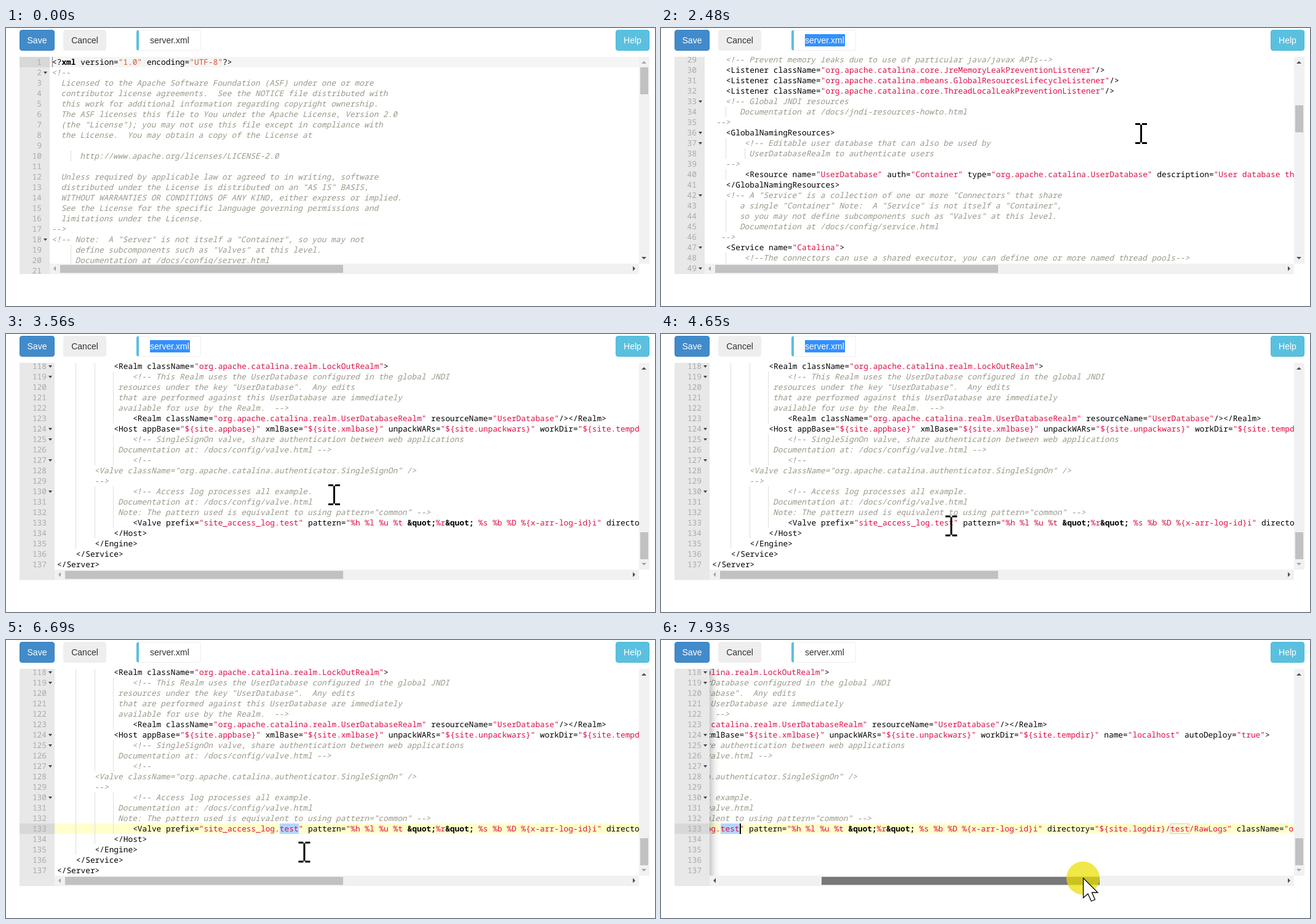
These frames come from a looping animation (1055 px wide and 453 px high, 8 s). An HTML page:

```html
<!DOCTYPE html>
<html lang="en">
<head>
<meta charset="utf-8">
<title>server.xml</title>
<style>
@property --s { syntax: '<length>'; inherits: true; initial-value: 0px }
@property --x { syntax: '<length>'; inherits: true; initial-value: 0px }
@property --g { syntax: '<length>'; inherits: true; initial-value: 49px }

html, body { margin: 0; width: 100%; height: 100%; overflow: hidden; background: #fff }
body { position: relative; font: 14px/20px "Liberation Sans", Arial, sans-serif; color: #333 }
div, svg { position: absolute; box-sizing: border-box }

.btn { top: 3px; height: 34px; border: 1px solid; border-radius: 4px; line-height: 32px; text-align: center; color: #fff }
#save { left: 22px; width: 57px; background: #428bca; border-color: #357ebd }
#cancel { left: 93px; width: 70px; background: #eee; border-color: #eee; color: #333 }
#help { left: 991px; width: 55px; background: #5bc0de; border-color: #46b8da }
#tab { left: 212px; top: 3px; width: 105px; height: 34px; border: 1px solid #eee; border-left: 4px solid #5bc0de; border-radius: 4px }
#name, #mark { left: 234px; top: 10px; height: 20px; white-space: nowrap }
#mark { width: 0; overflow: hidden; background: #3390ff; color: #fff }

#ed { left: 22px; top: 47px; width: 1024px; height: 354px; overflow: hidden; color: #000;
  font: 12.83px/17px "Noto Sans Mono", "DejaVu Sans Mono", monospace; text-rendering: geometricPrecision }
#gut { left: 0; top: 0; width: var(--g); height: 354px; overflow: hidden; background: #e8e8e8; color: #aaa }
#nums { left: 0; top: 0; width: 100%; transform: translateY(calc(0px - var(--s))) }
#nums p { position: relative; margin: 0; height: 17px; padding-right: 13px; text-align: right }
#nums .fold::after { content: ""; position: absolute; right: 4px; top: 7px; width: 6px; height: 4px;
  background: #444; clip-path: polygon(0 0, 100% 0, 50% 100%) }
#now { left: 0; top: 0; width: 100%; height: 17px; background: rgba(0,0,0,.07) }

#view { left: var(--g); top: 0; right: 17px; height: 337px; overflow: hidden }
#shade { inset: 0; box-shadow: 17px 0 16px -16px rgba(0,0,0,.4) inset }
#doc { left: 4px; top: 0; width: 3000px; transform: translate(calc(0px - var(--x)), calc(0px - var(--s))) }
#doc p { position: relative; margin: 0; height: 17px; white-space: pre }
#doc i { display: inline-block; width: 4ch; height: 17px; vertical-align: top; box-shadow: inset -1px 0 #dedede }
#doc em { position: relative; left: -1px; color: #998 }
#doc .str { color: #d14 }
#doc p.first .str { color: #d4562f }
#doc b { color: #000 }
#row, #pick, #twin { height: 17px }
#pick, #twin { top: 2244px }
#row { left: -4px; width: 3000px }
#pick { background: #b5d5ff }
#twin { left: 142ch; width: 4ch; border: 1px solid #c8c8fa }
#caret { height: 17px; width: 2px; background: #000 }

.bar { background: #f1f1f1 }
#vbar { right: 0; top: 0; width: 17px; height: 337px }
#hbar { left: var(--g); right: 17px; top: 337px; height: 17px }
#vthumb { left: 2px; width: 13px; height: 44px; top: calc(17px + var(--s) * .13); background: #c1c1c1 }
#hthumb { top: 2px; height: 13px; width: calc(509px - var(--g)); left: calc(17px + var(--x) * .4735); background: #c1c1c1 }
.tip { background: #505050 }
#up { left: 4px; top: 7px; width: 8px; height: 4px; clip-path: polygon(50% 0, 100% 100%, 0 100%) }
#down { left: 4px; bottom: 7px; width: 8px; height: 4px; clip-path: polygon(0 0, 100% 0, 50% 100%) }
#left { left: 6px; top: 4px; width: 4px; height: 8px; clip-path: polygon(100% 0, 100% 100%, 0 50%) }
#right { right: 6px; top: 4px; width: 4px; height: 8px; clip-path: polygon(0 0, 100% 50%, 0 100%) }

#cur { left: 0; top: 0 }
#ring { left: -27px; top: -27px; width: 54px; height: 54px; border-radius: 50%; background: rgba(235,224,0,.72) }
#cur svg { left: 0; top: 0; overflow: visible; width: 1px; height: 1px }

/* One loop is 8 s, so 1% is 80 ms */
#mark, #now, #shade, #row, #pick, #twin, #caret, #hthumb, #up, #down, #left, #cur, #ring, #beam, #arrow, #ed {
  animation: 8s step-end infinite }
#ed { animation-name: scroll, slide, widen }
#mark { animation-name: mark }
#now { animation-name: now }
#row { animation-name: row }
#pick { animation-name: pick }
#twin { animation-name: twin }
#caret { animation-name: caret, blink }
#shade { animation-name: shade }
#hthumb { animation-name: grab }
#up { animation-name: up }
#down { animation-name: down }
#left { animation-name: left }
#cur { animation-name: move }
#ring { animation-name: press }
#beam { animation-name: beam }
#arrow { animation-name: arrow }

@keyframes scroll {
  0% { --s: 0px }
  26.25% { --s: 0px; animation-timing-function: steps(6) }
  31% { --s: 480px; animation-timing-function: steps(5) }
  35.25% { --s: 1180px; animation-timing-function: steps(6) }
  40.625%, 100% { --s: 1992px }
}
@keyframes slide {
  0% { --x: 0px }
  90.125% { --x: 0px; animation-timing-function: steps(6) }
  95.125% { --x: 46px; animation-timing-function: steps(5) }
  99.125%, 100% { --x: 348px }
}
@keyframes widen { 0% { --g: 49px } 36.2%, 100% { --g: 57px } }
@keyframes mark {
  0% { width: 0 }
  15.125% { width: 22px }
  16% { width: 59px }
  16.875% { width: 64.5px }
  61.375%, 100% { width: 0 }
}
@keyframes now { 0% { top: 0 } 61.375%, 100% { top: 2244px } }
@keyframes row {
  0% { top: 0; background: #f5f5f5 }
  61.375%, 100% { top: 2244px; background: #ffc }
}
@keyframes pick {
  0% { left: 53ch; width: 0ch }
  61.375% { left: 53ch; width: 0ch; animation-timing-function: steps(11) }
  66.5% { left: 42ch; width: 11ch }
  73.125% { left: 49ch; width: 0ch }
  74%, 100% { left: 47ch; width: 4ch }
}
@keyframes twin { 0% { visibility: hidden } 74%, 100% { visibility: visible } }
@keyframes caret {
  0% { left: 0ch; top: 0; width: 1px }
  61.375% { left: 53ch; top: 2244px; width: 2px; animation-timing-function: steps(11) }
  66.5% { left: 42ch; top: 2244px; width: 2px }
  73.125% { left: 49ch; top: 2244px; width: 2px }
  74%, 100% { left: 51ch; top: 2244px; width: 2px }
}
@keyframes blink {
  0% { opacity: .5 }
  61.375%, 86.5%, 99%, 100% { opacity: 1 }
  80.25%, 92.75% { opacity: 0 }
}
@keyframes shade { 0% { opacity: 0 } 91%, 100% { opacity: 1 } }
@keyframes grab {
  0% { background: #c1c1c1 }
  87.2% { background: #a8a8a8 }
  88.25%, 100% { background: #787878 }
}
@keyframes up { 0% { background: #a3a3a3 } 27%, 100% { background: #505050 } }
@keyframes down { 0% { background: #505050 } 40.625%, 100% { background: #a3a3a3 } }
@keyframes left { 0% { background: #a3a3a3 } 91%, 100% { background: #505050 } }
@keyframes press {
  0%, 17.5%, 69.875%, 75.5% { visibility: hidden }
  14.375%, 61.375%, 73.125%, 88.25%, 100% { visibility: visible }
}
@keyframes beam {
  0%, 87.2%, 100% { visibility: hidden }
  1.625% { visibility: visible }
}
@keyframes arrow {
  0%, 1.625% { visibility: hidden }
  .875%, 87.2%, 100% { visibility: visible }
}
@keyframes move {
  0%, .875% { transform: translate(993px, 425px) }
  1.625% { transform: translate(720px, 330px) }
  2.5% { transform: translate(380px, 150px) }
  3.25% { transform: translate(215px, 50px) }
  5% { transform: translate(212px, 55px); animation-timing-function: steps(3) }
  7.5% { transform: translate(201px, 47px); animation-timing-function: steps(4) }
  11.25% { transform: translate(220px, 26px); animation-timing-function: steps(3) }
  13.5% { transform: translate(234px, 22px) }
  15.125% { transform: translate(255px, 22px) }
  16% { transform: translate(290px, 23px) }
  16.875% { transform: translate(296px, 23px) }
  18.75% { transform: translate(296px, 23px); animation-timing-function: steps(7) }
  24.375% { transform: translate(769px, 116px); animation-timing-function: steps(8) }
  31% { transform: translate(778px, 169px); animation-timing-function: steps(11) }
  40.625% { transform: translate(776px, 174px); animation-timing-function: steps(5) }
  44.5% { transform: translate(531px, 259px) }
  45.375% { transform: translate(458px, 292px) }
  46.25% { transform: translate(436px, 300px); animation-timing-function: steps(4) }
  50% { transform: translate(382px, 312px); animation-timing-function: steps(7) }
  55.625% { transform: translate(447px, 311px) }
  56.5% { transform: translate(460px, 310px); animation-timing-function: steps(3) }
  59% { transform: translate(488px, 309px) }
  61.375% { transform: translate(488px, 308px); animation-timing-function: steps(6) }
  66.5% { transform: translate(406px, 308px) }
  69% { transform: translate(401px, 308px) }
  69.875% { transform: translate(401px, 308px); animation-timing-function: steps(4) }
  73.125% { transform: translate(458px, 307px) }
  79.625% { transform: translate(458px, 307px); animation-timing-function: steps(10) }
  88.25% { transform: translate(519px, 396px) }
  90.125% { transform: translate(519px, 396px); animation-timing-function: steps(6) }
  95.125% { transform: translate(535px, 396px); animation-timing-function: steps(5) }
  99.125%, 100% { transform: translate(686px, 388px) }
}
</style>
</head>
<body>
<div class="btn" id="save">Save</div>
<div class="btn" id="cancel">Cancel</div>
<div id="tab"></div>
<div id="name">server.xml</div>
<div id="mark">server.xml</div>
<div class="btn" id="help">Help</div>

<div id="ed">
  <div id="gut"><div id="nums"><div id="now"></div></div></div>
  <div id="view">
    <div id="doc"><div id="row"></div><div id="pick"></div><div id="twin"></div></div>
    <div id="shade"></div>
  </div>
  <div class="bar" id="vbar"><div class="tip" id="up"></div><div id="vthumb"></div><div class="tip" id="down"></div></div>
  <div class="bar" id="hbar"><div class="tip" id="left"></div><div id="hthumb"></div><div class="tip" id="right"></div></div>
</div>

<div id="cur">
  <div id="ring"></div>
  <svg id="beam"><path d="M-7-12.5h8M4-12.500h8M-7 18.500h8M4 18.500h8M2.500-11.500v29" fill="none" stroke="#000" stroke-width="3"/></svg>
  <svg id="arrow"><path d="M.5 0V32L8 25.500 13.500 37.500 19.500 35 14.500 23.500H24Z" fill="#fff" stroke="#000" stroke-width="1.300"/></svg>
</div>

<script type="text/plain" id="src">
<?xml version="1.0" encoding="UTF-8"?>
<!--
  Licensed to the Apache Software Foundation (ASF) under one or more
  contributor license agreements.  See the NOTICE file distributed with
  this work for additional information regarding copyright ownership.
  The ASF licenses this file to You under the Apache License, Version 2.0
  (the "License"); you may not use this file except in compliance with
  the License.  You may obtain a copy of the License at

      http://www.apache.org/licenses/LICENSE-2.0

  Unless required by applicable law or agreed to in writing, software
  distributed under the License is distributed on an "AS IS" BASIS,
  WITHOUT WARRANTIES OR CONDITIONS OF ANY KIND, either express or implied.
  See the License for the specific language governing permissions and
  limitations under the License.
-->
<!-- Note:  A "Server" is not itself a "Container", so you may not
     define subcomponents such as "Valves" at this level.
     Documentation at /docs/config/server.html
 -->
<Server port="-1" shutdown="SHUTDOWN">
    <Listener className="org.apache.catalina.startup.VersionLoggerListener"/>
    <!-- Security listener. Documentation at /docs/config/listeners.html
  <Listener className="org.apache.catalina.security.SecurityListener" />
  -->
    <!--APR library loader. Documentation at /docs/apr.html -->
    <Listener className="org.apache.catalina.core.AprLifecycleListener" SSLEngine="on"/>
    <!-- Prevent memory leaks due to use of particular java/javax APIs-->
    <Listener className="org.apache.catalina.core.JreMemoryLeakPreventionListener"/>
    <Listener className="org.apache.catalina.mbeans.GlobalResourcesLifecycleListener"/>
    <Listener className="org.apache.catalina.core.ThreadLocalLeakPreventionListener"/>
    <!-- Global JNDI resources
       Documentation at /docs/jndi-resources-howto.html
  -->
    <GlobalNamingResources>
        <!-- Editable user database that can also be used by
         UserDatabaseRealm to authenticate users
    -->
        <Resource name="UserDatabase" auth="Container" type="org.apache.catalina.UserDatabase" description="User database that can be updated and saved" pathname="conf/tomcat-users.xml"/>
    </GlobalNamingResources>
    <!-- A "Service" is a collection of one or more "Connectors" that share
       a single "Container" Note:  A "Service" is not itself a "Container",
       so you may not define subcomponents such as "Valves" at this level.
       Documentation at /docs/config/service.html
   -->
    <Service name="Catalina">
        <!--The connectors can use a shared executor, you can define one or more named thread pools-->
        <!--
    <Executor name="tomcatThreadPool" namePrefix="catalina-exec-"
        maxThreads="150" minSpareThreads="4"/>
    -->
        <!-- A "Connector" represents an endpoint by which requests are received
         and responses are returned. Documentation at :
         Java HTTP Connector: /docs/config/http.html
         Java AJP  Connector: /docs/config/ajp.html
         APR (HTTP/AJP) Connector: /docs/apr.html
         Define a non-SSL/TLS HTTP/1.1 Connector on port 8080
    -->
        <Connector port="${port.http}" protocol="HTTP/1.1" connectionTimeout="20000" redirectPort="8443"/>
        <!-- A "Connector" using the shared thread pool-->
        <!--
    <Connector executor="tomcatThreadPool"
               port="8080" protocol="HTTP/1.1"
               connectionTimeout="20000"
               redirectPort="8443" />
    -->
        <!-- Define a SSL/TLS HTTP/1.1 Connector on port 8443
         This connector uses the NIO implementation that requires the JSSE
         style configuration. When using the APR/native implementation, the
         OpenSSL style configuration is required as described in the APR/native
         documentation
    -->
        <!--
    <Connector port="8443" protocol="org.apache.coyote.http11.Http11NioProtocol"
               maxThreads="150" SSLEnabled="true">
        <SSLHostConfig>
            <Certificate certificateKeystoreFile="conf/localhost-rsa.jks"
                         type="RSA" />
        </SSLHostConfig>
    </Connector>
               clientAuth="false" sslProtocol="TLS"
    -->
        <!-- Define an AJP 1.3 Connector on port 8009 -->
        <!--
    <Connector port="8009" protocol="AJP/1.3" redirectPort="8443" />
    -->
        <!-- An Engine represents the entry point (within Catalina) that processes
         every request.  The Engine implementation for Tomcat stand alone
         analyzes the HTTP headers included with the request, and passes them
         on to the appropriate Host (virtual host).
         Documentation at /docs/config/engine.html
    -->
        <!-- You should set jvmRoute to support load-balancing via AJP ie :
    <Engine name="Catalina" defaultHost="localhost" jvmRoute="jvm1">
    -->
        <Engine name="Catalina" defaultHost="localhost">
            <!--For clustering, please take a look at documentation at:
          /docs/cluster-howto.html  (simple how to)
          /docs/config/cluster.html (reference documentation) -->
            <!--
      <Cluster className="org.apache.catalina.ha.tcp.SimpleTcpCluster"/>
      -->
            <!--
      <Valve className="org.apache.catalina.valves.RemoteIpValve"
             remoteIpHeader="x-forwarded-for"
             protocolHeader="x-forwarded-proto" />
      -->
            <Valve className="org.apache.catalina.valves.ErrorReportValve" showServerInfo="false"/>
            <!-- The request dumper valve dumps useful debugging information about
             the request and response data received and sent by this Engine.
             Documentation at: /docs/config/valve.html -->
            <!--
      <Valve className="org.apache.catalina.valves.RequestDumperValve"/>
      -->
            <!-- Use the LockOutRealm to prevent attempts to guess user passwords
             via a brute-force attack -->
            <Realm className="org.apache.catalina.realm.LockOutRealm">
                <!-- This Realm uses the UserDatabase configured in the global JNDI
             resources under the key "UserDatabase".  Any edits
             that are performed against this UserDatabase are immediately
             available for use by the Realm.  -->
                <Realm className="org.apache.catalina.realm.UserDatabaseRealm" resourceName="UserDatabase"/></Realm>
            <Host appBase="${site.appbase}" xmlBase="${site.xmlbase}" unpackWARs="${site.unpackwars}" workDir="${site.tempdir}" name="localhost" autoDeploy="true">
                <!-- SingleSignOn valve, share authentication between web applications
             Documentation at: /docs/config/valve.html -->
                <!--
        <Valve className="org.apache.catalina.authenticator.SingleSignOn" />
        -->
                <!-- Access log processes all example.
             Documentation at: /docs/config/valve.html
             Note: The pattern used is equivalent to using pattern="common" -->
                <Valve prefix="site_access_log.test" pattern="%h %l %u %t &quot;%r&quot; %s %b %D %{x-arr-log-id}i" directory="${site.logdir}/test/RawLogs" className="org.apache.catalina.valves.AccessLogValve"/>
            </Host>
        </Engine>
    </Service>
</Server>
</script>
<script>
const $ = id => document.getElementById(id);
const esc = s => s.replace(/&/g, '&amp;').replace(/</g, '&lt;');
const paint = s => esc(s)
  .replace(/"[^"]*"/g, q => `<span class="str">${q.replace(/&amp;\w+;/g, '<b>$&</b>')}</span>`)
  .replace('?xml', '?<b>xml</b>');

let open = false, code = '', nums = '';
$('src').textContent.trim().split('\n').forEach((line, n) => {
  const text = line.trimStart();
  const col = line.length - text.length;
  const guides = Math.max(0, Math.floor((col - 1) / 4));
  const starts = !open && text.startsWith('<!--');
  const note = open || starts;
  const fold = starts ? !text.includes('-->')
    : !open && /^<\w.*[^/]>$/.test(text) && !/<\/\w+>$/.test(text);
  if (note) open = !text.includes('-->');
  code += `<p${n ? '' : ' class="first"'}>${'<i></i>'.repeat(guides)}${' '.repeat(col - guides * 4)}`
    + (note ? `<em>${esc(text)}</em>` : paint(text)) + '</p>';
  nums += `<p${fold ? ' class="fold"' : ''}>${n + 1}</p>`;
});
$('doc').insertAdjacentHTML('beforeend', code + '<div id="caret"></div>');
$('nums').insertAdjacentHTML('beforeend', nums);
</script>
</body>
</html>
```
